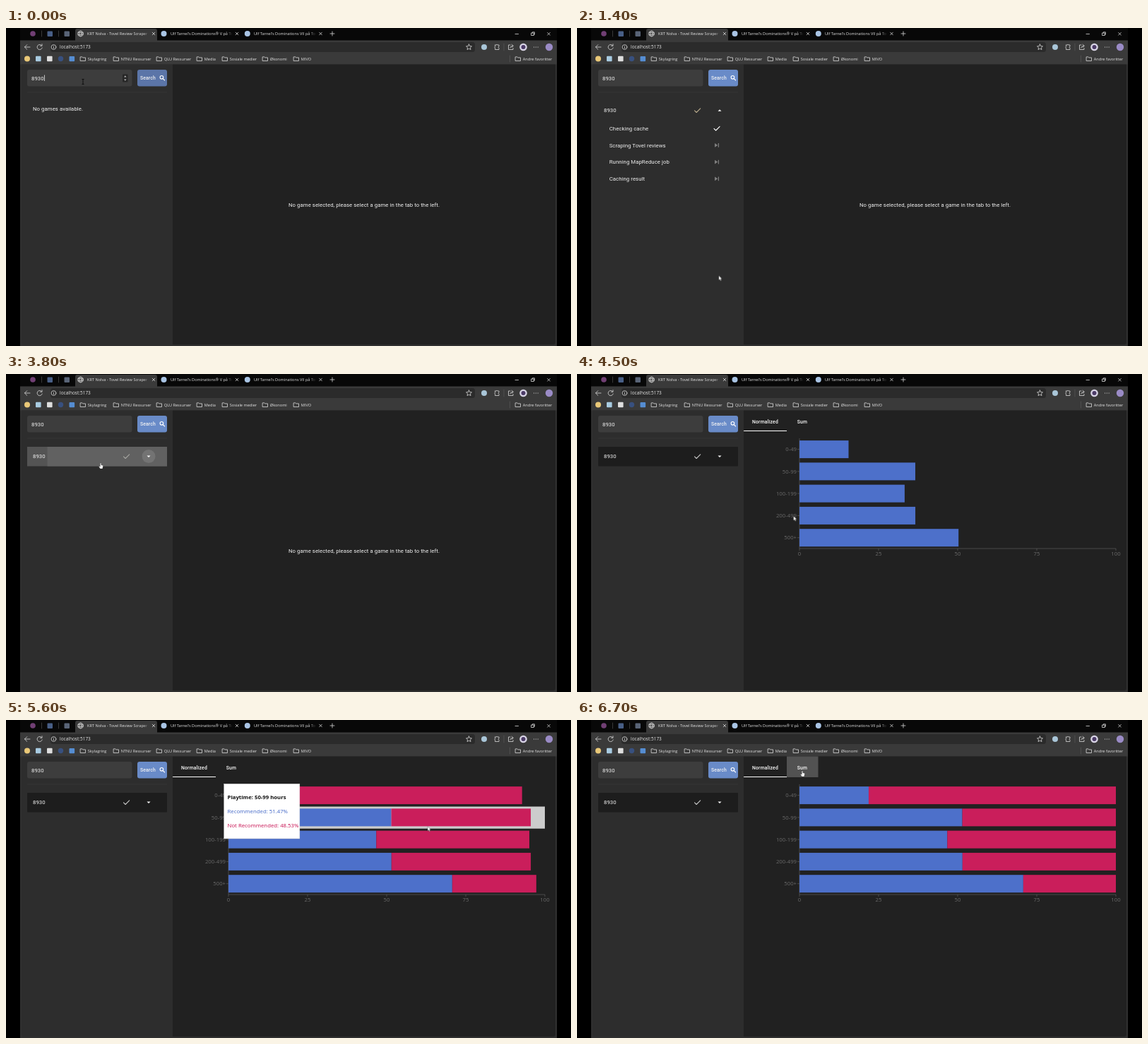
These frames come from a looping animation (800x450 px, 6.8 s). An HTML page:

```html
<!DOCTYPE html>
<html lang="en">
<head>
<meta charset="utf-8">
<title>Review scraper</title>
<style>
html, body { margin: 0; width: 100%; height: 100%; overflow: hidden; background: #000; }
svg { display: block; width: 800px; height: 450px; }
text { font: 7.75px Roboto, sans-serif; letter-spacing: .00938em; fill: #f2f2f2; }
.chrome text { font: 5.6px "Open Sans", "Noto Sans", sans-serif; letter-spacing: 0; fill: #e4e4e4; }
.chrome .url { font-size: 6.5px; }
.line { fill: none; stroke: #d8d8d8; stroke-width: .8; stroke-linecap: round; stroke-linejoin: round; }
.tab { font-size: 6.8px; font-weight: 500; letter-spacing: .02857em; text-anchor: middle; fill: #fff; }
.btn { font-size: 6.8px; font-weight: 500; letter-spacing: .02em; }
.axis text { font: 7.75px "Noto Sans", "Open Sans", sans-serif; letter-spacing: 0; fill: #666; }
.axis path { fill: none; stroke: #666; stroke-width: .6; }
.tip text { font: 7.75px "Noto Sans", "Open Sans", sans-serif; letter-spacing: 0; }

/* Hard switches */
.sw { animation: 6800ms step-end infinite; }
.empty { animation-name: empty; }
.row { animation-name: row; }
.spin { animation-name: spin; }
.caret { animation-name: caret; }
.up { animation-name: up; }
.down { animation-name: down; }
.ring { animation-name: ring; }
.hover { animation-name: hover; }
.ripple { animation-name: ripple; }
.blank { animation-name: blank; }
.result { animation-name: result; }
.sumhover { animation-name: sumhover; }
.mid { animation-name: mid; }
.low { animation-name: low; }
.beam { animation-name: beam; }
.arrow { animation-name: arrow; }
.hand { animation-name: hand; }
.tick { animation-name: tick; }
@keyframes empty { 0% { opacity: 1 } 10.2%, 100% { opacity: 0 } }
@keyframes row { 0% { opacity: 0 } 10.2%, 100% { opacity: 1 } }
@keyframes spin { 0% { opacity: 1 } 5.8%, 100% { opacity: 0 } }
@keyframes caret { 0% { opacity: 1 } 8.8%, 100% { opacity: 0 } }
@keyframes up { 0% { opacity: 0 } 13.2% { opacity: 1 } 45.5%, 100% { opacity: 0 } }
@keyframes down { 0% { opacity: 1 } 13.2% { opacity: 0 } 45.5%, 100% { opacity: 1 } }
@keyframes ring { 0% { opacity: 0 } 44% { opacity: 1 } 60%, 100% { opacity: 0 } }
@keyframes hover { 0% { opacity: 0 } 48.5% { opacity: 1 } 60%, 100% { opacity: 0 } }
@keyframes ripple { 0% { opacity: 0 } 54.4% { opacity: 1 } 60%, 100% { opacity: 0 } }
@keyframes blank { 0% { opacity: 1 } 60%, 100% { opacity: 0 } }
@keyframes result { 0% { opacity: 0 } 60%, 100% { opacity: 1 } }
@keyframes sumhover { 0% { opacity: 0 } 97%, 100% { opacity: 1 } }
@keyframes mid { 0% { opacity: 0 } 82% { opacity: 1 } 92.8%, 100% { opacity: 0 } }
@keyframes low { 0% { opacity: 0 } 92.8% { opacity: 1 } 95.6%, 100% { opacity: 0 } }
@keyframes beam { 0% { opacity: 1 } 5.8%, 100% { opacity: 0 } }
@keyframes arrow { 0% { opacity: 0 } 11.7% { opacity: 1 } 44% { opacity: 0 } 63.2% { opacity: 1 } 97%, 100% { opacity: 0 } }
@keyframes hand { 0% { opacity: 0 } 5.8% { opacity: 1 } 11.7% { opacity: 0 } 44% { opacity: 1 } 63.2% { opacity: 0 } 97%, 100% { opacity: 1 } }
@keyframes tick { 0% { stroke: #b8aa8c } 32.3% { stroke: #a4a4a0 } 60%, 100% { stroke: #c4c4c4 } }

/* Motion */
.search { animation: search 6800ms linear infinite; }
@keyframes search { 0% { fill: #5b75a8 } 4.4%, 100% { fill: #698bc8 } }
.steps { animation: steps 6800ms ease-in-out infinite; }
@keyframes steps {
  0%, 13.2% { clip-path: inset(0 0 100% 0) }
  15.4%, 45.6% { clip-path: inset(0) }
  48.5%, 100% { clip-path: inset(0 0 100% 0) }
}
.bar { transform-box: fill-box; transform-origin: left; }
.yes { fill: #4d70ca; animation: yes 6800ms linear infinite; }
.no { fill: #ca1e5b; animation: no 6800ms linear infinite; }
@keyframes yes { 0% { transform: scaleX(0) } 60.588% { transform: scaleX(0); animation-timing-function: ease } 73.897%, 100% { transform: scaleX(1) } }
@keyframes no { 0% { transform: scaleX(0) } 73.897% { transform: scaleX(0); animation-timing-function: ease } 87.206%, 100% { transform: scaleX(1) } }
.tip { animation: tip 6800ms ease infinite; }
@keyframes tip {
  0%, 82.353% { transform: translate(308px, 90px) }
  86%, 91.2% { transform: translate(610px, 166px) }
  93.4% { transform: translate(606px, 134px) }
  95.6%, 100% { transform: translate(500px, 114px) }
}
.mouse { animation: mouse 6800ms ease-in-out infinite; }
@keyframes mouse {
  0% { transform: translate(109px, 76px) }
  7.353%, 10.294% { transform: translate(206px, 72px) }
  17.647% { transform: translate(203px, 357px) }
  20.588%, 22.059% { transform: translate(200.8px, 350.5px) }
  30.882% { transform: translate(198px, 235px) }
  36.765% { transform: translate(193.4px, 200.2px) }
  41.176% { transform: translate(194px, 190px) }
  44.118%, 47.059% { transform: translate(202px, 115px) }
  52.941%, 55.882% { transform: translate(134px, 126px) }
  61.765% { transform: translate(136px, 126px) }
  72.059% { transform: translate(584px, 323px) }
  75%, 77% { transform: translate(588.3px, 331px) }
  82.353% { transform: translate(597px, 150.5px) }
  85.294% { transform: translate(600px, 157px) }
  91.176% { transform: translate(600px, 155px) }
  92.647% { transform: translate(598px, 126px) }
  97.059%, 100% { transform: translate(319px, 72px) }
}
</style>
</head>
<body>
<svg viewBox="0 0 800 450">
  <defs>
    <linearGradient id="fade"><stop offset=".9" stop-color="#fff"/><stop offset="1" stop-color="#000"/></linearGradient>
    <mask id="titles" maskUnits="userSpaceOnUse" x="0" y="0" width="800" height="18">
      <rect x="112" width="91" height="18" fill="url(#fade)"/>
      <rect x="230" width="91" height="18" fill="url(#fade)"/>
      <rect x="348" width="91" height="18" fill="url(#fade)"/>
    </mask>
    <path id="check" d="M-4 .2 L-1.4 2.8 L4.2 -2.8"/>
    <path id="skip" d="M-3 -2.9 L1.3 0 L-3 2.9 Z M1.8 -2.9 H3 V2.9 H1.8 Z"/>
    <path id="folder" d="M.5 -2.6 H3 L4 -1.6 H7.5 V3 H.5 Z"/>
    <path id="x" d="M-1.8 -1.8 L1.8 1.8 M1.8 -1.8 L-1.8 1.8"/>
  </defs>

  <g class="chrome">
    <rect x="20" width="760" height="450" fill="#303030"/>
    <rect x="20" width="760" height="18" fill="#080808"/>
    <path d="M98 18 V4 Q98 1 101 1 H211 Q214 1 214 4 V18 Z" fill="#3a3a3a"/>
    <rect x="20" y="17.5" width="760" height="34" fill="#3a3a3a"/>
    <rect x="63" y="20" width="601" height="14" rx="3.5" fill="#2b2b2b"/>

    <circle cx="38" cy="8" r="3.8" fill="#713f74"/>
    <rect x="58.5" y="4.5" width="7.5" height="7.5" rx="1" fill="#485f86"/>
    <rect x="82.5" y="4.5" width="7.5" height="7.5" rx="1" fill="#596477"/>
    <path class="line" d="M50.5 4 V12 M74.5 4 V12" style="stroke:#444"/>
    <g class="line">
      <circle cx="105.5" cy="8" r="3.8"/>
      <ellipse cx="105.5" cy="8" rx="1.7" ry="3.8"/>
      <path d="M102 6.6 H109 M102 9.4 H109"/>
    </g>
    <circle cx="223.5" cy="8" r="4" fill="#a9c4e4"/>
    <circle cx="341.8" cy="8" r="4" fill="#a9c4e4"/>
    <g mask="url(#titles)">
      <text x="115" y="10">KRT Nolva - Tovel Review Scraper</text>
      <text x="233" y="10">Ulf Tarnel's Dominations® V på Tovel</text>
      <text x="351" y="10">Ulf Tarnel's Dominations VII på Tovel</text>
    </g>
    <g class="line">
      <use href="#x" x="209" y="8"/><use href="#x" x="327" y="8"/><use href="#x" x="445.5" y="8"/>
      <path d="M459 8 H465 M462 5 V11 M721 8.5 H725.5"/>
      <path d="M744 7 H747.3 V10.5 H744 Z M745.2 7 V5.8 H748.4 V9.2 H747.3"/>
      <use href="#x" x="768.5" y="8.3"/>
      <path d="M34 27 H26.5 M29.7 23.7 L26.4 27 L29.7 30.3"/>
      <path d="M50.7 25 A3.6 3.6 0 1 0 51.2 28 M51 22.8 V25.3 H48.5"/>
      <circle cx="67.5" cy="27" r="3.4"/><path d="M67.5 26.8 V28.8 M67.5 25.2 V25.3"/>
      <path d="M655.5 23 L656.7 25.6 L659.5 25.9 L657.4 27.8 L658 30.6 L655.5 29.2 L653 30.6 L653.6 27.8 L651.5 25.9 L654.3 25.6 Z"/>
      <path d="M692.5 24 H694 Q695 22.5 696 24 H698 V26 Q696 27 698 28.5 V30.5 H692.5 V28.5 Q691 27 692.5 26 Z"/>
      <path d="M714 24 H711.5 V30.5 H718 V28.5 M713.7 28 Q714 25.5 717.8 25.3 M716 23.3 L718.3 25.3 L716 27.3" />
      <path d="M747.5 27 H747.6 M750.3 27 H750.4 M753.1 27 H753.2" style="stroke-width:1.2"/>
      <path d="M705 22 V32 M713.5 39 V48" style="stroke:#555"/>
    </g>
    <circle cx="677" cy="27" r="4" fill="#a9c6d8"/>
    <circle cx="732.5" cy="27" r="5.3" fill="#d9d5e6"/>
    <circle cx="732.5" cy="27" r="3" fill="#4d3c69"/>
    <circle cx="769" cy="27" r="5.2" fill="#9a8bc6"/>
    <text class="url" x="76" y="29.4">localhost:5173</text>

    <circle cx="30" cy="43.5" r="4" fill="#e9c878"/>
    <rect x="42" y="39.7" width="7.6" height="7.6" rx="1" fill="#a8cbe1"/>
    <rect x="58" y="39.7" width="7.6" height="7.6" rx="1" fill="#dedede"/>
    <circle cx="77.5" cy="43.5" r="3.7" fill="#38507f"/>
    <rect x="89.5" y="40" width="7.6" height="7.2" rx="1" fill="#558dd2"/>
    <g id="marks"></g>
  </g>

  <path d="M22 51.5 H236 V448 H25 Q22 448 22 445 Z" fill="#2d2d2d"/>
  <path d="M236 51.5 H778 V445 Q778 448 775 448 H236 Z" fill="#212121"/>

  <rect x="30" y="59" width="148.5" height="23.5" rx="3" fill="#3d3d3d"/>
  <text x="36" y="73.6">8930</text>
  <rect class="sw caret" x="54" y="66.5" width=".7" height="8.5" fill="#fff"/>
  <g class="sw spin">
    <rect x="165" y="65.5" width="7.5" height="11" rx="1" fill="#272727"/>
    <path d="M167 69.5 L168.8 67.2 L170.6 69.5 Z M167 72.5 L168.8 74.8 L170.6 72.5 Z" fill="#bbb"/>
  </g>
  <rect class="search" x="186" y="59" width="42" height="23.5" rx="3"/>
  <text class="btn" x="190" y="73.2">Search</text>
  <g class="line" style="stroke:#fff;stroke-width:1.1"><circle cx="220.4" cy="69.8" r="2.3"/><path d="M222.2 71.6 L224.6 74"/></g>
  <path d="M30 91 H228" stroke="#3b3b3b" stroke-width=".7"/>

  <text class="sw empty" x="38" y="117.2">No games available.</text>

  <g class="sw row">
    <rect class="sw hover" x="30" y="103" width="198" height="27.5" fill="#545454"/>
    <rect class="sw ripple" x="58.5" y="103" width="169.5" height="27.5" fill="#616161"/>
    <rect class="sw result" x="30" y="103" width="198" height="27.5" rx="1" fill="#1d1d1d"/>
    <circle class="sw ring" cx="202" cy="116.5" r="9.5" fill="#737373"/>
    <text x="38" y="119.4">8930</text>
    <use class="line sw tick" href="#check" x="170.5" y="116.7" style="stroke-width:1.1"/>
    <path class="sw up" d="M199.5 117.7 H204.5 L202 115.2 Z" fill="#fff"/>
    <path class="sw down" d="M199.5 115.5 H204.5 L202 118 Z" fill="#fff"/>
    <g class="steps" id="steps"></g>
  </g>

  <text class="sw blank" x="400" y="252.6">No game selected, please select a game in the tab to the left.</text>

  <g class="sw result">
    <rect class="sw sumhover" x="297" y="51.5" width="44.5" height="29.5" fill="#525252"/>
    <text class="tab" x="266.5" y="69.8">Normalized</text>
    <text class="tab" x="319" y="69.8">Sum</text>
    <rect x="236" y="80" width="61" height="1" fill="#fff"/>
    <rect class="sw low" x="315" y="91.3" width="448" height="31.2" fill="#ccc"/>
    <rect class="sw mid" x="315" y="122.5" width="448" height="31.2" fill="#ccc"/>
    <g class="axis" id="axis"></g>
    <g id="bars"></g>
    <g class="tip" id="tip"></g>
  </g>

  <g class="mouse">
    <path class="sw beam" d="M-1.5 -3.5 H1.5 M0 -3.5 V3.5 M-1.5 3.5 H1.5" stroke="#050505" stroke-width=".8"/>
    <path class="sw arrow" d="M0 0 V6.3 L1.5 5 L2.5 7.2 L3.5 6.8 L2.6 4.6 H4.5 Z" fill="#fff" stroke="#222" stroke-width=".3"/>
    <path class="sw hand" d="M-.7 .3 Q0 -.4 .7 .3 V2.8 L3 3.3 Q3.6 3.6 3.4 4.6 L2.7 8 H-.7 L-2.6 5 Q-2.5 4.2 -1.6 4.5 L-.7 5.2 Z" fill="#fff" stroke="#222" stroke-width=".3"/>
  </g>
</svg>

<script>
const fill = (id, html) => { document.getElementById(id).innerHTML = html; };
const each = (list, draw) => list.map(draw).join('');

const marks = [[105, 'Skylagring'], [152, 'NTNU Ressurser'], [213, 'QLU Ressurser'], [270, 'Media'],
  [306, 'Sosiale medier'], [363, 'Økonomi'], [407, 'MIVO'], [721, 'Andre favoritter']];
fill('marks', each(marks, ([x, name]) =>
  `<use class="line" href="#folder" x="${x}" y="43.5"/><text x="${x + 10.8}" y="45.6">${name}</text>`));

const steps = ['Checking cache', 'Scraping Tovel reviews', 'Running MapReduce job', 'Caching result'];
fill('steps', each(steps, (name, i) => {
  const y = 142.2 + i * 23.7;
  const icon = i
    ? `<use href="#skip" x="198" y="${y}" fill="#7e7e7e"/>`
    : `<use class="line" href="#check" x="198" y="${y}" style="stroke:#fff;stroke-width:1.1"/>`;
  return `<text x="45.7" y="${y + 2.6}">${name}</text>${icon}`;
}));

// Chart: share of positive reviews by playtime
const left = 315, width = 448, pitch = 31.27;
const groups = [['0-49', 21.87], ['50-99', 51.47], ['100-199', 46.72], ['200-499', 51.52], ['500+', 70.73]];
const rowMid = i => 106.6 + i * pitch;
const px = share => width * share / 100;

fill('axis', `<path d="M315 91 V247 H763"/>` +
  each(groups, ([name], i) =>
    `<path d="M312 ${rowMid(i)} H315"/><text x="311" y="${rowMid(i) + 2.8}" text-anchor="end">${name}</text>`) +
  each([0, 25, 50, 75, 100], n =>
    `<path d="M${left + px(n)} 247 V250"/><text x="${left + px(n)}" y="257" text-anchor="middle">${n}</text>`));

const bar = (kind, from, share, i) =>
  `<rect class="bar ${kind}" x="${left + px(from)}" y="${rowMid(i) - 12.5}" width="${px(share)}" height="25"/>`;
fill('bars', each(groups, ([, share], i) => bar('yes', 0, share, i) + bar('no', share, 100 - share, i)));

const tip = (kind, [name, share]) => `<g class="sw ${kind}">
  <rect x=".2" y=".2" width="107.2" height="77.6" fill="#fff" stroke="#ccc" stroke-width=".5"/>
  <text x="5" y="22.2" style="font-weight:700;fill:#111">Playtime: ${name} hours</text>
  <text x="5" y="42" style="fill:#4d70ca">Recommended: ${share.toFixed(2)}%</text>
  <text x="5" y="61.8" style="fill:#ca1e5b">Not Recommended: ${(100 - share).toFixed(2)}%</text></g>`;
fill('tip', tip('low', groups[0]) + tip('mid', groups[1]));
</script>
</body>
</html>
```
